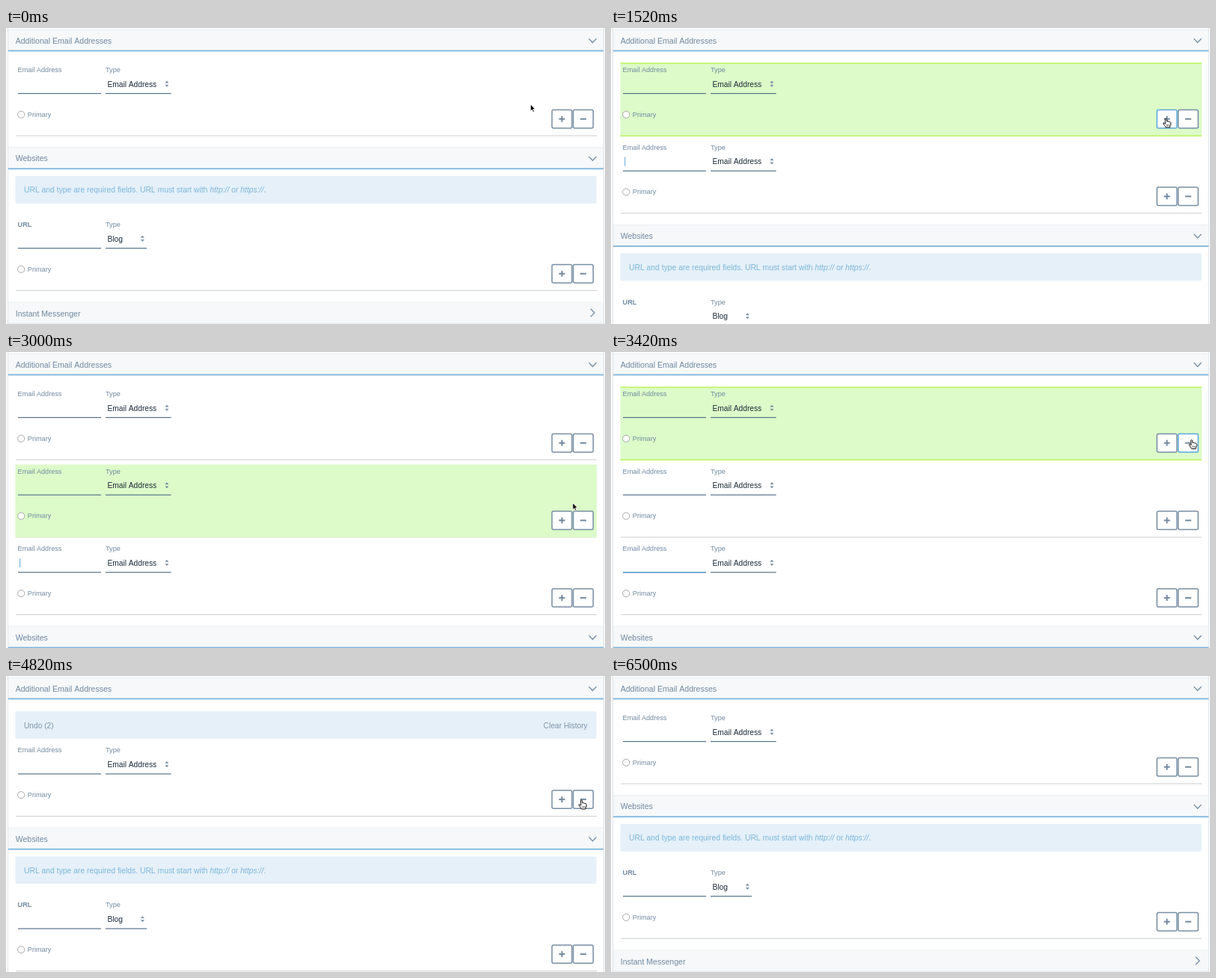
These frames come from a looping animation (800x396 px, 6520 ms). An HTML page with a canvas:

```html
<!DOCTYPE html>
<html lang="en">
<head>
<meta charset="utf-8">
<title>Repeating form rows</title>
<style>
html, body { margin: 0; width: 100%; height: 100%; overflow: hidden; background: #fff; }
canvas { display: block; width: 800px; height: 396px; }
</style>
</head>
<body>
<canvas id="stage" width="800" height="396"></canvas>
<script>
const ctx = document.getElementById('stage').getContext('2d');
const LOOP = 6520, ROW = 103.6, BAR = 43.4;
const FONT = '"Liberation Sans", Arial, sans-serif';
const INK = '#7089a0', LINE = '#58738c', BLUE = '#5aa9dc', PALE = '#e5f0f9';

// Pointer hot spot: time, x, y
const POINTER = [
  [0, 700.5, 102], [600, 741, 121], [1560, 741, 121], [2340, 732, 184.5],
  [2500, 741, 224], [2900, 741, 224], [3130, 780, 170], [3350, 775.5, 117.5],
  [3900, 775.5, 117.5], [4380, 768.5, 166], [4900, 768.5, 166],
  [5380, 762.5, 68.5], [5780, 762.5, 68.5], [5950, 772, 112], [6350, 815, 95]
];

// Life of each row; hover holds [on, off] spans
const ROWS = [
  { added: -1000, removed: 3900, hover: [[680, 1780], [3200, 4100]] },
  { added: 1200, removed: 4560, focus: [1300, 2600], hover: [[2140, 3000], [4320, 4600]] },
  { added: 2560, removed: 9999, focus: [2850, 3900], hover: [[5840, 6120]] }
];

const clamp = v => Math.max(0, Math.min(1, v));
const smooth = v => { v = clamp(v); return v * v * (3 - 2 * v); };
const ramp = (t, start, length) => smooth((t - start) / length);
const span = (t, [on, off], length) => ramp(t, on, length) * (1 - ramp(t, off, length));

function rect(x, y, w, h, color) {
  ctx.fillStyle = color;
  ctx.fillRect(x, y, w, h);
}

function text(str, x, y, size, color, style = '') {
  ctx.font = `${style} ${size}px ${FONT}`;
  ctx.fillStyle = color;
  ctx.fillText(str, x, y);
  return x + ctx.measureText(str).width;
}

function path(points, color, width, fill) {
  ctx.beginPath();
  points.forEach(([x, y]) => ctx.lineTo(x, y));
  if (fill) {
    ctx.closePath();
    ctx.fillStyle = fill;
    ctx.fill();
  }
  ctx.strokeStyle = color;
  ctx.lineWidth = width;
  ctx.stroke();
}

function roundBox(x, y, w, h, r, fill, stroke) {
  ctx.beginPath();
  ctx.roundRect(x, y, w, h, r);
  ctx.fillStyle = fill;
  ctx.fill();
  if (stroke) {
    ctx.strokeStyle = stroke;
    ctx.lineWidth = 1.5;
    ctx.stroke();
  }
}

function pointerAt(t) {
  const i = POINTER.findIndex(p => p[0] > t);
  if (i < 0) return POINTER.at(-1).slice(1);
  const [t0, x0, y0] = POINTER[i - 1], [t1, x1, y1] = POINTER[i];
  const k = smooth((t - t0) / (t1 - t0));
  return [x0 + (x1 - x0) * k, y0 + (y1 - y0) * k];
}

function header(title, y, open) {
  rect(3, y, 795, 28, '#f6f8f9');
  rect(3, y - .5, 795, 1, '#eceff2');
  rect(3, y + 27.6, 795, open ? 1.8 : 1, open ? '#7db5dc' : '#dfe5ea');
  text(title, 12.7, y + 18.6, 10.55, INK);
  path(open
    ? [[778.5, y + 12.3], [783.5, y + 17.5], [788.5, y + 12.3]]
    : [[780.8, y + 8.8], [786, y + 14], [780.8, y + 19.2]], '#758da3', 1.3);
}

function button(x, y, plus, hot) {
  roundBox(x, y, 26.6, 24.4, 2, '#fff', hot ? BLUE : '#788fa5');
  const cx = x + 13.3, cy = y + 12.2;
  rect(cx - 4, cy - 1, 8, 2, '#72899f');
  if (plus) rect(cx - 1, cy - 4, 2, 8, '#72899f');
}

// Coordinates are those of the first row, shifted down by dy
function row(dy, label, type, typeEnd, { green = 0, focus = 0, caret = false, hot = '' } = {}) {
  ctx.save();
  ctx.translate(0, dy);
  rect(13, 143.6, 776, 1.2, '#d3d6d9');
  if (green > 0) {
    ctx.globalAlpha = green;
    rect(12.5, 47, 776.5, 97.5, '#dcfbc9');
    if (hot) {
      rect(12.5, 46.3, 776.5, 1.8, '#c2f56c');
      rect(12.5, 143.4, 776.5, 1.8, '#c2f56c');
    }
    ctx.globalAlpha = 1;
  }
  text(label, 15.6, 59, 9.15, INK, label === 'URL' ? 'bold' : '');
  text('Type', 133, 59, 9.15, INK);
  rect(16, 87, 111, 1.2, LINE);
  if (focus > 0) {
    ctx.globalAlpha = focus;
    rect(16, 87, 111, 1.3, BLUE);
    ctx.globalAlpha = 1;
  }
  if (caret) rect(18.2, 69, 1, 12, BLUE);
  text(type, 135.5, 78.5, 10.2, '#1d2b39');
  rect(133, 87, typeEnd - 133, 1.2, LINE);
  const ax = typeEnd - 5.7;
  path([[ax - 2, 73.3], [ax, 71], [ax + 2, 73.3]], INK, .5, INK);
  path([[ax - 2, 76.2], [ax, 78.5], [ax + 2, 76.2]], INK, .5, INK);
  ctx.beginPath();
  ctx.arc(20.2, 115.8, 4.6, 0, 7);
  ctx.fillStyle = '#fff';
  ctx.fill();
  ctx.strokeStyle = '#a9a9a9';
  ctx.lineWidth = 1;
  ctx.stroke();
  text('Primary', 28.8, 118.6, 9.15, INK);
  button(729.2, 109.5, true, hot === '+');
  button(757.6, 109.5, false, hot === '-');
  ctx.restore();
}

function clipped(y, height, draw) {
  ctx.save();
  ctx.beginPath();
  ctx.rect(0, y, 800, height);
  ctx.clip();
  draw();
  ctx.restore();
}

function arrow(x, y) {
  ctx.save();
  ctx.translate(x, y);
  path([[0, 0], [0, 9], [2, 7.2], [3.5, 10.4], [5, 9.7], [3.6, 6.7], [6.2, 6.5]], '#fff', .8, '#000');
  ctx.restore();
}

function hand(x, y) {
  ctx.save();
  ctx.translate(x, y);
  path([[-1, .5], [0, 0], [1, .6], [1.4, 4], [3, 3.7], [4, 4.4], [5.5, 4.4], [6.6, 5.4],
    [6.8, 8], [5.6, 10.5], [5.4, 12], [0, 12], [-1.6, 9.4], [-3.5, 7], [-3, 5.8],
    [-.6, 7.2], [-1, .5]], '#111', 1, '#fff');
  for (const dx of [1, 2.6, 4.2]) rect(dx, 8, .6, 2.4, '#111');
  ctx.restore();
}

function buttonUnder(x, y, dy) {
  if (y < 109 + dy || y > 134 + dy) return '';
  return x > 728 && x < 757 ? '+' : x >= 757 && x < 785 ? '-' : '';
}

function infoText(y) {
  const color = '#7db6d8';
  let x = text('URL and type are required fields. URL must start with ', 24, y, 10.36, color);
  x = text('http://', x, y, 10.36, color, 'italic');
  x = text(' or ', x, y, 10.36, color);
  x = text('https://', x, y, 10.36, color, 'italic');
  text('.', x, y, 10.36, color);
}

function undoBar(t, underline) {
  roundBox(12.5, 47.3, 776, 36.5, 2, PALE);
  text(`Undo (${t < 4600 ? 1 : 2})`, 24, 69.5, 10.2, '#7f95a9');
  const end = text('Clear History', 717.8, 69.5, 10.2, '#7f95a9');
  if (underline) rect(717.8, 71, end - 717.8, .9, '#7f95a9');
}

function draw(t) {
  rect(0, 0, 800, 396, '#fff');
  const [x, y] = pointerAt(t);
  const bar = BAR * span(t, [3900, 5660], 140);
  const onLink = bar > 30 && x > 717 && x < 778 && y > 58 && y < 76;
  let overButton = false;

  header('Additional Email Addresses', 2, true);
  if (bar > 0) clipped(44, bar, () => undoBar(t, onLink));

  let dy = bar;
  for (const r of ROWS) {
    const height = ROW * ramp(t, r.added, 280) * (1 - ramp(t, r.removed, 220));
    if (height <= 0) continue;
    const hot = buttonUnder(x, y, dy);
    const green = Math.max(...r.hover.map(h => span(t, h, 180)));
    const focused = r.focus && t >= r.focus[0] && t < r.focus[1];
    overButton ||= hot !== '';
    clipped(44 + dy, height, () => row(dy, 'Email Address', 'Email Address', 220.5, {
      green,
      focus: focused ? ramp(t, r.focus[0] + 150, 300) : 0,
      caret: focused && (t - r.focus[0]) % 1000 < 500,
      hot: green > .3 ? hot : ''
    }));
    dy += height;
  }

  const shift = dy - ROW;
  header('Websites', 159.8 + shift, true);
  roundBox(12.5, 198 + shift, 776, 36.7, 2, PALE);
  infoText(220.4 + shift);
  row(207 + shift, 'URL', 'Blog', 188);
  header('Instant Messenger', 367 + shift, false);

  rect(2, 0, 1, 396, '#dde3e8');
  rect(798, 0, 1, 396, '#dde3e8');
  (overButton || onLink ? hand : arrow)(x, y);
}

const start = performance.now();
function tick() {
  draw((performance.now() - start) % LOOP);
  requestAnimationFrame(tick);
}
tick();
</script>
</body>
</html>
```
